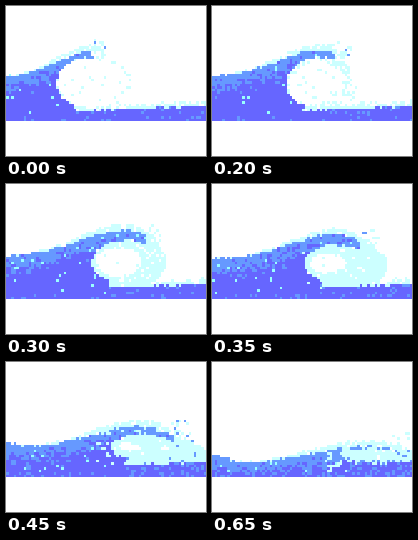
These frames come from a looping animation (200 px wide and 150 px high, 0.7 s). An HTML page with a canvas:

```html
<!DOCTYPE html>
<html>
<head>
<meta charset="utf-8">
<title>Breaking wave</title>
<style>
html, body { margin: 0; width: 100%; height: 100%; overflow: hidden; background: #fff; }
canvas { display: block; width: 200px; height: 150px; image-rendering: pixelated; }
</style>
</head>
<body>
<canvas id="stage" width="80" height="60"></canvas>
<script>
const CELL = 2.5, COLS = 80, ROWS = 60, FLOOR = 115;
const STEP = 50, STEPS = 14;
const DEEP = "#66f", BLUE = "#69f", FOAM = "#cff", PALE = "#9ff";

const ctx = document.getElementById("stage").getContext("2d");
const clamp = v => Math.max(0, Math.min(1, v));
const smooth = v => (v = clamp(v)) * v * (3 - 2 * v);
const bell = v => Math.exp(-v * v);

function noise(x, y, seed) {
  let h = Math.imul(x + 11, 374761393) ^ Math.imul(y + 7, 668265263) ^ Math.imul(seed + 3, 1274126177);
  h = Math.imul(h ^ (h >>> 13), 1103515245);
  h = Math.imul(h ^ (h >>> 15), 2246822519);
  return ((h ^ (h >>> 16)) >>> 0) / 4294967296;
}

// The wave at time k, in tenths of a second: it travels right, curls over, then collapses.
function waveAt(k) {
  const fall = smooth((k - 2.5) / 4);
  const closed = smooth((k - 1.5) / 2);
  const cx = 88 + 10.5 * k, cy = 77 + 15 * fall;
  const rx = 38 - 1.5 * k, ry = 26 - 20 * Math.sqrt(fall);
  const top = 44 + 40 * fall;
  const tip = Math.min(84 + 18.5 * k, 180);
  const eye = Math.max(0, .93 - k * k / 33);
  const sea = x => 107 - .035 * x;
  const slope = x => bell((x - cx) / (x < cx ? 50 + 5 * k : 60));
  const crest = x => {
    const base = x < cx ? 71 + 32 * fall - 10 * fall * bell(x / 20) : sea(x);
    return base - (base - top) * slope(x);
  };
  return {
    fall, closed, cx, cy, rx, tip, eye, sea, slope, crest,
    shoulder: cx - rx / 2,
    lip: 2 + 10 * (1 - fall),
    ring: (x, y, shift = 0) => Math.hypot((x - cx + shift) / rx, (y - cy) / ry)
  };
}

function cellColour(w, col, row, step) {
  const rnd = n => noise(col, row, step * 8 + n);
  const x = (col + .5) * CELL + rnd(0) - .5;
  const y = (row + .5) * CELL + (rnd(1) - .5) * 2;
  const grain = (noise(col >> 1, row, step * 8 + 2) + rnd(3)) / 2;
  const surface = w.crest(x), below = y - surface;
  const ring = w.ring(x, y);

  if (x > w.shoulder && y > w.sea(x) || row > 43) return rnd(4) < .93 - .25 * w.fall ? DEEP : BLUE;

  const inLip = below < w.lip && x < w.tip && y < w.cy;
  if (below > 0 && ring > 1 && (x < w.shoulder || inLip)) {
    if (x > w.cx - w.rx - 15 && grain < .35 * w.fall) return FOAM;
    if (rnd(4) < .025) return PALE;
    return grain < .1 + below / 30 ? DEEP : BLUE;
  }

  if (below > -6 * w.slope(x) && below < 1 && x < w.tip + 12) return rnd(4) < .85 ? FOAM : null;

  // Droplets thrown ahead of the tip.
  const ahead = Math.hypot(x - w.tip - 8, y - w.crest(w.tip) + 14 * w.fall);
  if (ahead < 11) {
    if (rnd(5) < .06 * (1 - w.fall)) return BLUE;
    if (rnd(6) < .2) return FOAM;
  }

  if (w.ring(x, y, w.rx * (1 - w.eye) * .6) < w.eye) return rnd(4) < .06 ? FOAM : null;
  if (ring < 1 && rnd(4) < .3 + .65 * w.closed) return FOAM;
  if (x > w.shoulder && below > -3 && ring > 1 && ring < 1.1 + 3 * w.fall && rnd(4) < w.closed) {
    return grain < .3 * w.fall ? BLUE : FOAM;
  }
  return x > w.shoulder && rnd(5) < (y - w.sea(x) + 7) / 7 ? FOAM : null;
}

function draw(step) {
  const wave = waveAt(step * STEP / 100);
  ctx.clearRect(0, 0, COLS, ROWS);
  for (let row = 13; row < FLOOR / CELL; row++) {
    for (let col = 0; col < COLS; col++) {
      const colour = cellColour(wave, col, row, step);
      if (!colour) continue;
      ctx.fillStyle = colour;
      ctx.fillRect(col, row, 1, 1);
    }
  }
}

let shown = -1;
function tick() {
  const step = Math.floor(performance.now() / STEP) % STEPS;
  if (step !== shown) draw(shown = step);
  requestAnimationFrame(tick);
}
tick();
</script>
</body>
</html>
```
